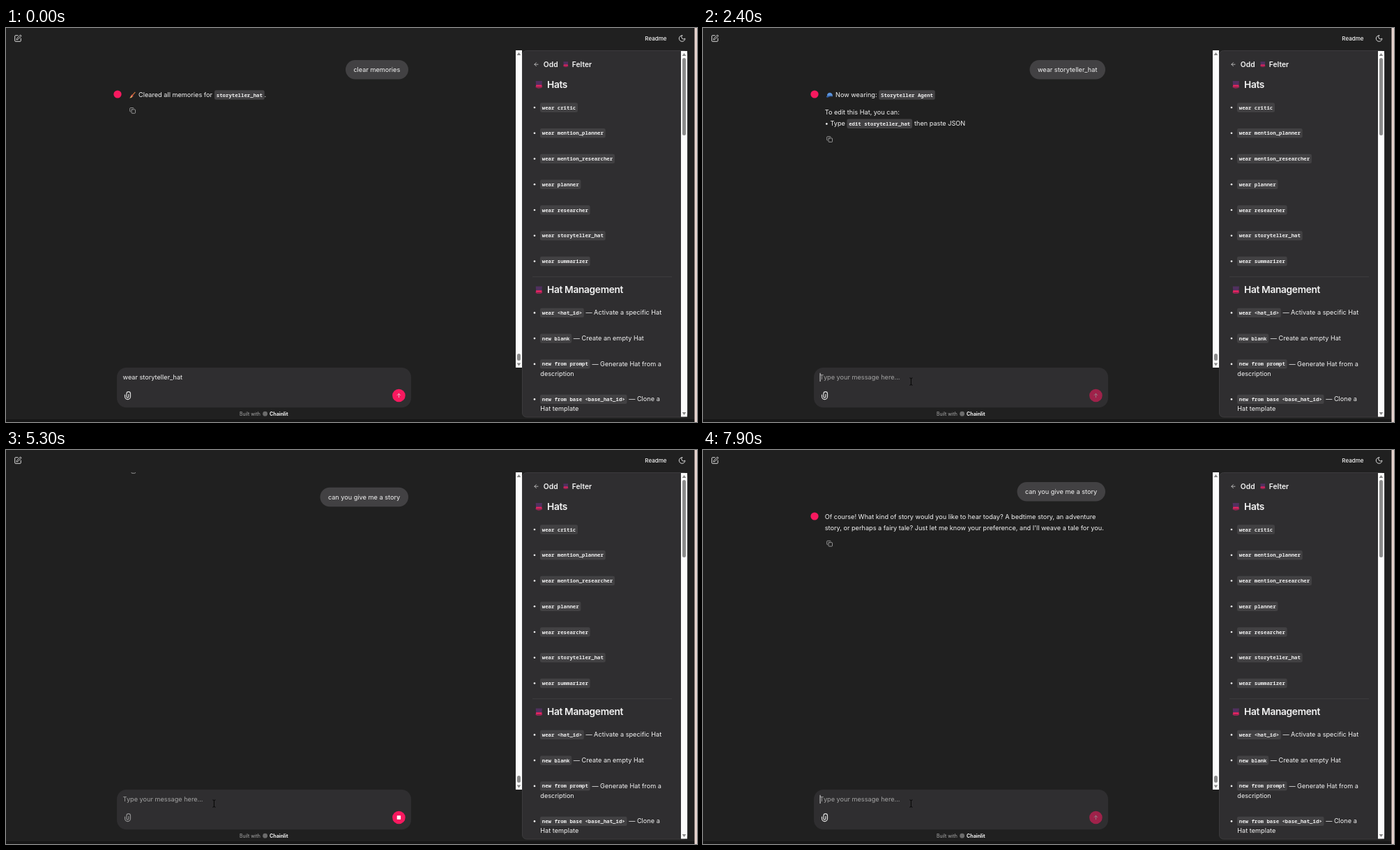
Animation, 991 px wide and 565 px high, one loop 8000 ms. Source, as an HTML page:

```html
<!DOCTYPE html>
<html lang="en">
<head>
<meta charset="utf-8">
<title>Chat with hats</title>
<style>
  html, body { margin: 0; width: 100%; height: 100%; overflow: hidden; background: #202020; }
  svg { display: block; }
  text { font: 9.17px Inter, sans-serif; fill: #f4f4f4; white-space: pre; }
  .code { font: 700 7.35px "Noto Sans Mono", monospace; fill: #f0f0f0; }
  .title { font-size: 10.3px; font-weight: 600; }
  .heading { font-size: 13.75px; font-weight: 600; letter-spacing: -.025em; }
  .nav { font-size: 8.02px; font-weight: 500; }
  .foot { font-size: 6.9px; fill: #aaa; }
  .brand { font-size: 7.1px; font-weight: 700; }
  .line { fill: none; stroke: #e4e4e4; stroke-width: 2; stroke-linecap: round; stroke-linejoin: round; }
  .soft { stroke: #b4b4b4; }
  .hint { fill: #a3a3a3; }
</style>
</head>
<body>
<svg id="stage" width="991" height="565" viewBox="0 0 991 565"></svg>
<script>
const PINK = '#f7195f', PANEL = '#2f2e30', CHIP = '#424143';
const LOOP = 8000, CHAR = 4.41, PAD = 2.75;

const esc = s => s.replace(/</g, '&lt;').replace(/>/g, '&gt;');
const text = (x, y, s, cls = '') => `<text x="${x}" y="${y}" class="${cls}">${esc(s)}</text>`;
const rect = (x, y, w, h, fill, r = 0) =>
  `<rect x="${x}" y="${y}" width="${w}" height="${h}" rx="${r}" fill="${fill}"/>`;
const dot = (x, y, r, fill) => `<circle cx="${x}" cy="${y}" r="${r}" fill="${fill}"/>`;
const path = (d, fill) => `<path d="${d}" fill="${fill}"/>`;
const group = (x, y, body, scale = 1) =>
  `<g transform="translate(${x} ${y}) scale(${scale})">${body}</g>`;

// 24-unit outline icon centred on a point
const icon = (x, y, scale, body, cls = '') =>
  group(x, y, `<g class="line ${cls}" transform="translate(-12 -12)">${body}</g>`, scale);

const chip = (x, y, s) =>
  rect(x, y - 6.7, s.length * CHAR + PAD * 2, 13.4, CHIP, 2.3) + text(x + PAD, y + 2.5, s, 'code');

const copyIcon = y => icon(181.6, y, .39,
  '<rect x="8" y="8" width="14" height="14" rx="2"/><path d="M4 16c-1.1 0-2-.9-2-2V4c0-1.1.9-2 2-2h10c1.1 0 2 .9 2 2"/>', 'soft');

const hat = (x, y, scale = 1) => group(x, y,
  path('M-4.6-5H4.6L4 3H-4Z', '#51305f') +
  path('M-4.2 .6H4.2V3.4H-4.2Z', '#e3245f') +
  path('M-5.2 2.8Q0 5 5.2 2.8Q4.6 5.4 0 5.4T-5.2 2.8Z', '#a32358'), scale);

const broom = group(181.5, 96,
  '<path d="M3.8-4.2L-.6 1" stroke="#c9703c" stroke-width="1.3"/>' +
  path('M-1.2-.4L.9 1.6Q-1 4.6-4.2 4.4Q-2.6 2.6-1.2-.4Z', '#e2a05c') +
  path('M-1.4-.6L1.1 1.8L.4 2.6L-2 .4Z', '#d8364a'));

const cap = group(181.5, 96,
  path('M-3.6 1.4Q-3.6-3.2 .6-3.2Q4.4-3 4.4 2Q0 .4-3.6 1.4Z', '#5b93dc') +
  path('M-4.8 2.4Q-3.6 .4 1.4 1.2Q3.6 1.6 4.4 2.4Q0 2-2.4 3.4Q-4.6 3.8-4.8 2.4Z', '#3566b0'));

const scrollbar = (x, top, bottom, thumbY, thumbH) =>
  rect(x, top, 9, bottom - top, '#fbfbfb') +
  path(`M${x + 4.5} ${top + 3}l2.8 4h-5.6z`, '#858585') +
  path(`M${x + 4.5} ${bottom - 2.5}l2.8-4h-5.6z`, '#858585') +
  rect(x + 2, thumbY, 5, thumbH, '#8b8b8b', 2.5);

const bubble = (width, s) =>
  rect(577 - width, 46, width, 27.5, CHIP, 13.75) + text(577 - width + 11.4, 63.2, s);

const talk = (id, ask, reply) =>
  `<g id="talk${id}">${ask}<g id="reply${id}">${dot(160, 95, 5.6, PINK)}${reply}</g></g>`;

const talks = [
  talk(0, bubble(90, 'clear memories'),
    broom + text(190, 98.8, 'Cleared all memories for') + chip(299, 96, 'storyteller_hat') +
    text(370.6, 98.8, '.') + copyIcon(118.4)),
  talk(1, bubble(108.5, 'wear storyteller_hat'),
    cap + text(190, 98.8, 'Now wearing:') + chip(252.3, 96, 'Storyteller Agent') +
    text(174.7, 124.2, 'To edit this Hat, you can:') + text(174.7, 140.2, '• Type') +
    chip(206.4, 137.2, 'edit storyteller_hat') + text(303, 140.2, 'then paste JSON') + copyIcon(159.6)),
  talk(2, bubble(126.5, 'can you give me a story'),
    text(174.7, 98.8, 'Of course! What kind of story would you like to hear today? A bedtime story, an adventure') +
    text(174.7, 115, "story, or perhaps a fairy tale? Just let me know your preference, and I'll weave a tale for you.") +
    copyIcon(134.2))
].join('');

const item = (y, code, x, note, more) => dot(758, y, 1.35, '#f0f0f0') + chip(766, y, code) +
  (note ? text(x, y + 2.9, note) : '') + (more ? text(766.3, y + 16.6, more) : '');

const hats = ['critic', 'mention_planner', 'mention_researcher', 'planner', 'researcher', 'storyteller_hat', 'summarizer'];

const sidebar =
  `<rect x="740.5" y="32.5" width="237" height="525.5" rx="6" fill="${PANEL}" stroke="#3c3b3d"/>` +
  icon(760.5, 52.2, .36, '<path d="M19 12H5m7-7-7 7 7 7"/>') +
  text(770.8, 55.6, 'Odd', 'title') + hat(802.8, 52, .74) + text(811.8, 55.6, 'Felter', 'title') +
  hat(764.3, 81) + text(776, 85.6, 'Hats', 'heading') +
  hats.map((name, i) => item(114 + i * 36.75, 'wear ' + name)).join('') +
  rect(755, 356.4, 200, .8, '#424143') +
  hat(764.3, 375.6) + text(776, 380.2, 'Hat Management', 'heading') +
  item(408.4, 'wear <hat_id>', 831.4, '— Activate a specific Hat') +
  item(445.1, 'new blank', 813.8, '— Create an empty Hat') +
  item(481.9, 'new from prompt', 840.4, '— Generate Hat from a', 'description') +
  item(532.4, 'new from base <base_hat_id>', 893.2, '— Clone a', 'Hat template') +
  scrollbar(968, 33, 557.5, 43, 111);

const header =
  icon(17, 15, .478, '<path d="M12 3H5a2 2 0 0 0-2 2v14a2 2 0 0 0 2 2h14a2 2 0 0 0 2-2v-7"/><path d="M18.4 2.6a1 1 0 0 1 3 3l-9 9a2 2 0 0 1-.9.5l-2.9.9a.5.5 0 0 1-.6-.6l.9-2.9a2 2 0 0 1 .5-.9z"/>') +
  text(916.3, 17.8, 'Readme', 'nav') +
  icon(969.6, 15, .478, '<path d="M12 3a6 6 0 0 0 9 9 9 9 0 1 1-9-9Z"/>');

const composer =
  rect(159, 487, 422, 57.2, PANEL, 13.75) +
  '<text id="draft" x="167.6" y="504.2"></text>' +
  rect(0, 494.8, .9, 12.2, '#f4f4f4').replace('<rect', '<rect id="caret"') +
  group(174.5, 527, '<path id="clip" class="line" style="stroke-width:1.15" d="M-4-1v2.6a4 4 0 0 0 8 0V-2.6a2.8 2.8 0 0 0-5.6 0v4.2a1.5 1.5 0 0 0 3 0V-1.6"/>') +
  `<g id="send">${dot(563.4, 527, 9.3, PINK)}${icon(563.4, 527, .38, '<path d="M12 19V5m-6 6 6-6 6 6"/>')}</g>` +
  `<g id="stop">${dot(563.4, 527, 9.3, PINK)}${rect(560.7, 524.3, 5.4, 5.4, '#fff', .5)}</g>` +
  text(335, 555.9, 'Built with', 'foot') + dot(371.6, 553.2, 3.4, '#6c6c6c') +
  text(378, 555.9, 'Chainlit', 'brand');

const pointers =
  '<path id="beam" d="M-2-5.2Q0-5.2 0-4V4Q0 5.2-2 5.2M2-5.2Q0-5.2 0-4M0 4Q0 5.2 2 5.2" fill="none" stroke="#050505" stroke-width="1"/>' +
  '<path id="hand" d="M-2-5.4Q-1-6.4 0-5.4V-1.6L3.4-.8Q4.6-.4 4.4 1L3.6 5.4H-1.6L-4.6 1.4Q-4.4 0-3 .6L-2 1.4Z" fill="#fff" stroke="#111" stroke-width=".8" stroke-linejoin="round"/>';

const stage = document.getElementById('stage');
stage.innerHTML =
  '<defs><clipPath id="view"><rect x="0" y="32" width="731" height="455"/></clipPath></defs>' +
  rect(0, 0, 991, 565, '#202020') + rect(0, 561, 988, 4, '#161616') + rect(987.5, 0, 3.5, 565, '#e6d3ce') +
  header + `<g clip-path="url(#view)">${talks}</g>` + scrollbar(731, 32, 487, 467, 10) +
  sidebar + composer + pointers;

const el = id => document.getElementById(id);
const show = (id, on) => { el(id).style.display = on ? '' : 'none'; };
const within = (t, ...spans) => spans.some(([a, b]) => t >= a && t < b);
const ease = p => p < .5 ? 4 * p ** 3 : 1 - 4 * (1 - p) ** 3;
const progress = (t, from, to) => ease(Math.min(1, Math.max(0, (t - from) / (to - from))));

const SENT = [0, 1600, 5100], REPLIED = [0, 2000, 6400], GAP = [0, 97, 138], SCROLL = 265;
const MESSAGE = 'can you give me a story';
const KEYS = [[2700, 0], [3200, 4], [3400, 5], [4200, 17], [4300, 18], [4800, 23]];

function typedCount(t) {
  const next = KEYS.findIndex(([time]) => time > t);
  if (next === 0) return 0;
  if (next < 0) return MESSAGE.length;
  const [t0, n0] = KEYS[next - 1], [t1, n1] = KEYS[next];
  return Math.floor(n0 + (n1 - n0) * (t - t0) / (t1 - t0));
}

function drawChat(t) {
  for (let i = 0; i < 3; i++) {
    const enter = i ? GAP[i] * (1 - progress(t, SENT[i], SENT[i] + SCROLL)) : 0;
    const leave = i < 2 ? GAP[i + 1] * progress(t, SENT[i + 1], SENT[i + 1] + SCROLL) : 0;
    el('talk' + i).setAttribute('transform', `translate(0 ${enter - leave})`);
    show('talk' + i, t >= SENT[i] && (i === 2 || t < SENT[i + 1] + SCROLL));
    show('reply' + i, t >= REPLIED[i]);
  }
}

function drawComposer(t) {
  const draft = t < SENT[1] ? 'wear storyteller_hat'
    : t < SENT[2] ? MESSAGE.slice(0, typedCount(t)) : '';
  const busy = within(t, [SENT[1], REPLIED[1]], [SENT[2], REPLIED[2]]);
  const label = el('draft');
  label.textContent = draft || 'Type your message here...';
  label.setAttribute('class', draft ? '' : 'hint');
  el('caret').setAttribute('x', 167.6 + (draft ? label.getComputedTextLength() : 0));
  show('caret', within(t, [100, 600], [2100, 5100], [5800, 6400], [6900, 7400], [7800, LOOP]));
  el('clip').style.opacity = busy ? .55 : 1;
  show('send', !busy);
  show('stop', busy);
  el('send').style.opacity = draft ? 1 : .56;
}

function drawPointer(t) {
  const reach = progress(t, 700, 1300) - progress(t, 1700, 2200);
  const x = 298.4 + 269 * reach, y = 507 + 25 * reach;
  const onButton = x > 554;
  for (const id of ['beam', 'hand']) el(id).setAttribute('transform', `translate(${x} ${y})`);
  show('beam', t >= 700 && !onButton);
  show('hand', onButton);
}

function frame(now) {
  const t = now % LOOP;
  drawChat(t);
  drawComposer(t);
  drawPointer(t);
  requestAnimationFrame(frame);
}
requestAnimationFrame(frame);
</script>
</body>
</html>
```
